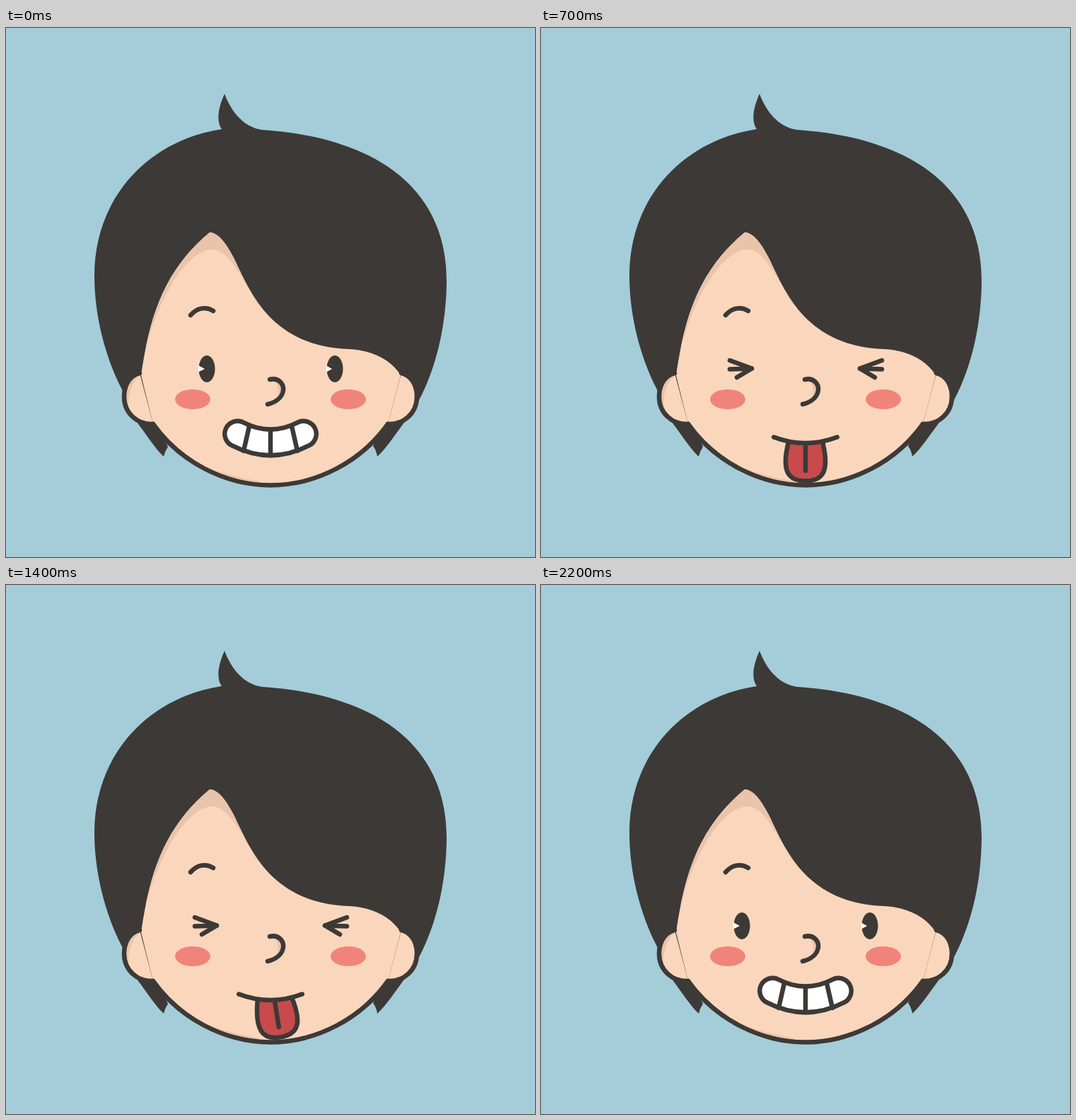
An HTML page that plays this animation: 748 px wide and 748 px high, repeating every 3.2 s.

```html
<!DOCTYPE html>
<html lang="en">
<head>
<meta charset="utf-8">
<title>Cheeky face</title>
<style>
  html, body { margin: 0; width: 100%; height: 100%; overflow: hidden; background: #a4cdd9; }
  svg { display: block; width: 100%; height: 100%; }
  .dark { fill: #3d3936; }
  .skin { fill: #fad7bc; }
  .shade { fill: #e9c4ab; }
  .cheek { fill: #f0847b; }
  .line { fill: none; stroke: #3d3936; stroke-width: 6.5; stroke-linecap: round; stroke-linejoin: round; }
  .white { stroke: #fff; }
</style>
</head>
<body>
<svg viewBox="0 0 748 748">
  <defs>
    <path id="face" d="M191 491L208 560C245 612 308 646.500 374 646.500S503 612 540 560L558 491C545 470 520 456 485 454C378 450 347 378 324 329C312 305 300 289 288 289C214 350 201 428 191 491Z"/>
    <path id="ear" d="M189 488C176 491 167 504 167 521C167 545 186 561 208 560"/>
    <clipPath id="inSkin"><use href="#face"/><use href="#ear"/></clipPath>
    <clipPath id="belowLip"><path d="M300 564L329 578Q374 596 419 578L448 564V700H300Z"/></clipPath>
    <g id="eye">
      <path id="lid" class="dark"/>
      <path id="prongs" class="line"/>
    </g>
  </defs>

  <path class="dark" d="M309 93C318 117 335 140 362 144C503 153 624 213 623 360C622 430 605 488 582 530L560 562C550 575 538 594 525 606Q524 598 519 591L541 550H208L229 592Q225 598 223 606C210 594 198 574 187 560L166 515C142 470 125 410 125 350C125 241 200 159 305 143C297 132 300 113 309 93Z"/>

  <g class="skin">
    <use href="#ear"/>
    <use href="#ear" transform="translate(748) scale(-1 1)"/>
    <use href="#face"/>
  </g>
  <g class="shade" clip-path="url(#inSkin)">
    <path d="M198 452L150 250H370L356 391C335 355 315 314 293 313C255 313 215 385 198 452Z"/>
    <path d="M190 491C178 500 171 520 174 542L160 540V490Z"/>
    <path d="M222 583C255 613 300 631 358 641L340 665L215 610Z"/>
  </g>
  <g class="line">
    <use href="#ear"/>
    <use href="#ear" transform="translate(748) scale(-1 1)"/>
    <path d="M208 560C245 612 308 646.500 374 646.500S503 612 540 560"/>
  </g>

  <ellipse class="cheek" cx="264" cy="525" rx="25" ry="14"/>
  <ellipse class="cheek" cx="484" cy="525" rx="25" ry="14"/>
  <path class="line" d="M261 406C270 396 282 393 293 400"/>
  <path class="shade" d="M379 498C388 509 386 521 378 529C392 525 398 506 379 498Z"/>
  <path class="line" d="M373 497C385 494 393 503 392 512C391 522 382 529 370 532"/>

  <use href="#eye"/>
  <use href="#eye" transform="translate(749) scale(-1 1)"/>
  <path id="glints" fill="#fff" d="M272 477L281 482L272 486.500ZM453 477.500L461 482L453 486.500Z"/>

  <g clip-path="url(#belowLip)">
    <g id="tongue" class="line">
      <path fill="#c84a4c" d="M350 520V585C340 625 348 640.500 374 640.500S408 625 398 585V520"/>
      <path d="M374 520V626"/>
    </g>
  </g>

  <path id="lips" class="line"/>
  <path id="whites" class="line white"/>
  <path id="gaps" class="line"/>
</svg>
<script>
  const $ = id => document.getElementById(id);
  const setAttrs = (id, attrs) => Object.entries(attrs).forEach(([name, value]) => $(id).setAttribute(name, value));
  const show = (id, visible) => { $(id).style.display = visible ? '' : 'none'; };
  const mix = (a, b, k) => a + (b - a) * k;
  const mixPoint = (p, q, k) => [mix(p[0], q[0], k), mix(p[1], q[1], k)];
  const smooth = (x, from, to) => {
    const k = Math.min(1, Math.max(0, (x - from) / (to - from)));
    return k * k * (3 - 2 * k);
  };

  // The mouth is one bent, round-ended stroke: 0 is a thin smile, 2 a wide grin.
  function drawMouth(grin) {
    const wide = Math.max(0, grin - 1);
    const thick = 6.5 + 18.25 * grin;
    const x = 326 - 20 * wide + thick / 2;
    const y = 578.5 - 4.5 * wide;
    const d = `M${x} ${y}Q374 ${2 * (587 - grin / 2) - y} ${748 - x} ${y}`;
    setAttrs('lips', { d, style: `stroke-width:${thick}` });
    setAttrs('whites', { d, style: `stroke-width:${Math.max(0, thick - 13)}` });

    const reach = thick / 2 - 4;
    const gaps = [-1, 0, 1].map(side => {
      const top = 374 + side * (52 - 11 * grin);
      const bottom = 374 + side * (34 + 2 * grin);
      const middle = side ? 580.5 : 586;
      return `M${top} ${middle - reach}L${bottom} ${middle + reach}`;
    });
    setAttrs('gaps', { d: gaps.join('') });
    show('gaps', thick > 13);
  }

  // Quarter arc that bulges towards the corner of its box.
  function arc(from, to, corner, round) {
    return `C${mixPoint(from, corner, round)} ${mixPoint(to, corner, round)} ${to}`;
  }

  // The round eye sharpens into a fan, then shrinks into three prongs.
  function drawEyes(squint) {
    const fan = Math.min(1, squint * 2);
    const shut = Math.max(0, squint * 2 - 1);
    const x = 284 - 8 * fan, height = 19 - 5.5 * fan;
    const round = 0.55 * (1 - 0.8 * fan);
    const top = [x, 482 - height], bottom = [x, 482 + height];
    const right = [295.5, 482], left = [272.5, 482];
    const d = `M${top}` +
      arc(top, right, [right[0], top[1]], round) +
      arc(right, bottom, [right[0], bottom[1]], round) +
      arc(bottom, left, [left[0], bottom[1]], round) +
      arc(left, top, [left[0], top[1]], round) + 'Z';
    const apex = [298, 481.5];
    setAttrs('lid', { d, transform: `translate(${apex}) scale(${1 - shut}) translate(${-apex[0]} ${-apex[1]})` });

    const tips = [[267, 470], [267, 482.5], [277, 494]];
    setAttrs('prongs', { d: tips.map(tip => `M${mixPoint(apex, tip, mix(0.6, 1, shut))}L${apex}`).join('') });
    show('prongs', shut > 0);
    show('glints', shut === 0);
  }

  function drawTongue(out, angle) {
    setAttrs('tongue', { transform: `rotate(${angle} 374 552) translate(0 ${-62 * (1 - out)})` });
    show('tongue', out > 0);
  }

  function draw(now) {
    const step = Math.min(22, Math.floor(now % 3200 / 100));
    drawMouth(2 * (1 - smooth(step, 0, 6) + smooth(step, 18, 22)));
    drawEyes(step < 7 ? (step / 7) ** 2 : 1 - smooth(step, 15, 21));
    const wag = step > 7 && step < 15 ? Math.sin((step - 7) / 4 * Math.PI) : 0;
    drawTongue(smooth(step, 4, 7) - smooth(step, 15, 18), 13 * wag);
  }

  const start = performance.now();
  function tick() {
    draw(performance.now() - start);
    requestAnimationFrame(tick);
  }
  tick();
</script>
</body>
</html>
```
